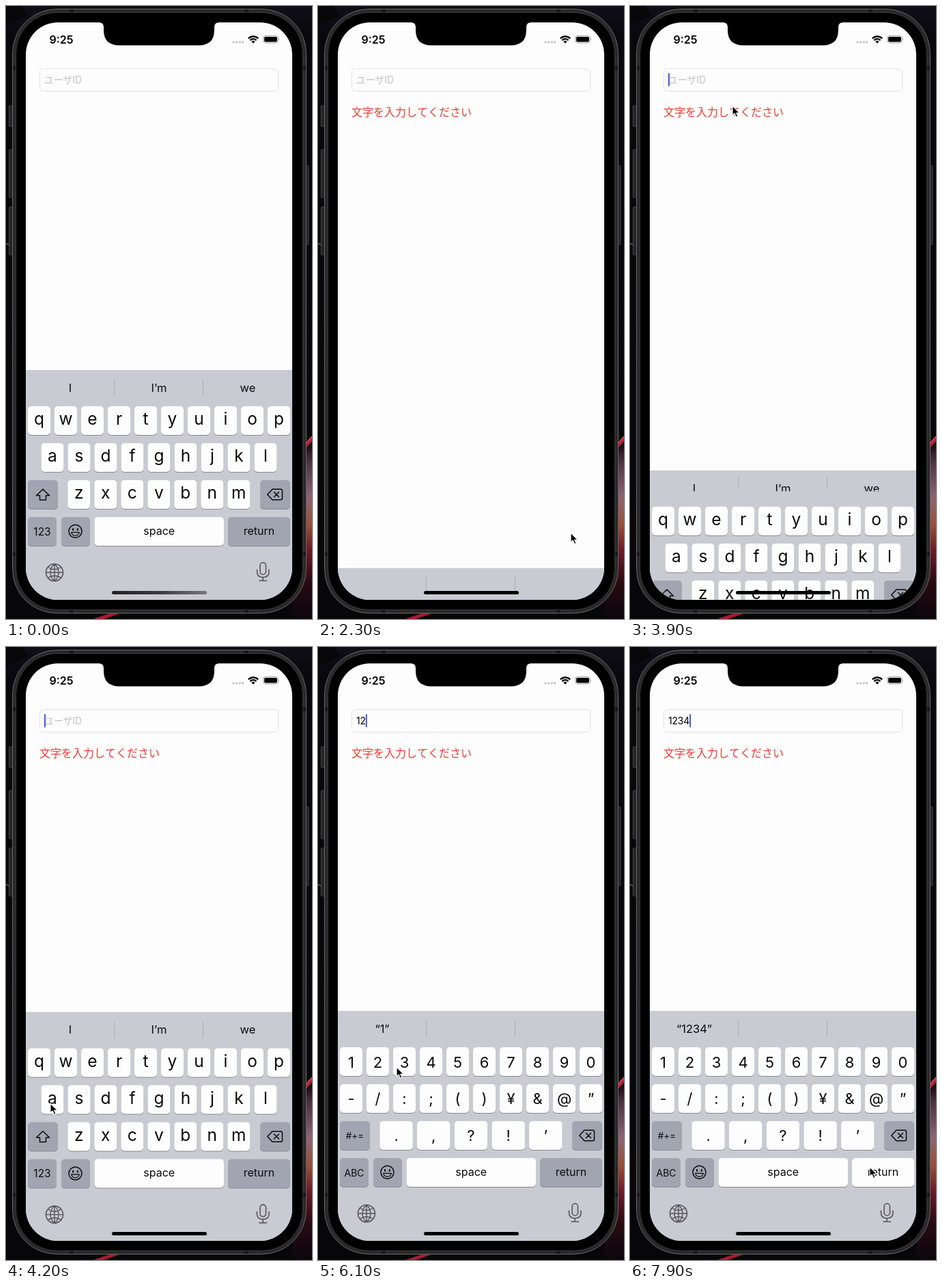
Write an HTML page with a canvas that moves like this. It is 448 by 896 pixels and loops after 8000 ms.

```html
<!DOCTYPE html>
<html lang="ja">
<head>
<meta charset="utf-8">
<title>User ID form</title>
<style>
  html, body { margin: 0; width: 100%; height: 100%; overflow: hidden; background: #08070a; }
  canvas { display: block; }
</style>
</head>
<body>
<canvas id="stage" width="448" height="896"></canvas>
<script>
const ctx = document.getElementById('stage').getContext('2d');
const LOOP = 8000;
const FONT = 'Inter, "Noto Sans CJK JP", "Noto Sans CJK", sans-serif';
const KEYBOARD_TOP = 532, SCREEN_BOTTOM = 868;
const HIDE_AT = 2115, SHOW_AT = 3800, NUMBERS_AT = 4700;
const TYPED_AT = [5350, 5960, 6400, 6900];
const SUGGEST_DELAY = 200;

// Pointer path: time, x, y
const POINTER = [
  [1600, 452, 700], [1950, 370, 770], [2400, 370, 770], [3300, 150, 108],
  [3750, 150, 110], [3900, 150, 146], [4200, 65, 667], [4550, 52, 766],
  [4750, 52, 766], [5200, 46, 612], [5400, 46, 612], [5750, 87, 612],
  [5950, 87, 612], [6100, 115, 614], [6450, 120, 613], [6750, 163, 612],
  [7000, 163, 612], [7650, 351, 760], [8000, 351, 760]
];

const clamp = v => Math.max(0, Math.min(1, v));
const ease = v => v * v * (3 - 2 * v);
// Critically damped spring from 0 to 1
const spring = ms => {
  const u = 0.0187 * Math.max(0, ms);
  return 1 - (1 + u) * Math.exp(-u);
};

function box(x, y, w, h, r, fill, stroke, width = 1) {
  ctx.beginPath();
  ctx.roundRect(x, y, w, h, r);
  if (fill) { ctx.fillStyle = fill; ctx.fill(); }
  if (stroke) { ctx.strokeStyle = stroke; ctx.lineWidth = width; ctx.stroke(); }
}

function path(d, fill, stroke, width = 1.5) {
  const p = new Path2D(d);
  if (fill) { ctx.fillStyle = fill; ctx.fill(p); }
  if (stroke) {
    ctx.strokeStyle = stroke;
    ctx.lineWidth = width;
    ctx.lineCap = ctx.lineJoin = 'round';
    ctx.stroke(p);
  }
}

function text(str, x, y, size, color = '#0b0b0c', align = 'center', weight = 400) {
  ctx.font = `${weight} ${size}px ${FONT}`;
  ctx.textAlign = align;
  ctx.fillStyle = color;
  ctx.fillText(str, x, y);
}

function gradient(x0, y0, x1, y1, stops) {
  const g = ctx.createLinearGradient(x0, y0, x1, y1);
  stops.forEach(([at, color]) => g.addColorStop(at, color));
  return g;
}

function drawWallpaper() {
  ctx.fillStyle = gradient(0, 0, 0, 896, [[0, '#100e19'], [0.05, '#09080c'], [1, '#070608']]);
  ctx.fillRect(0, 0, 448, 896);
  path('M0 0H22L32 12L0 30Z', '#07070a');
  path('M0 347L6 350', null, '#4a4a50', 2);
  ctx.fillStyle = gradient(0, 640, 0, 896, [
    [0, '#14070c'], [0.1, '#4c3240'], [0.3, '#8d6472'], [0.46, '#9a5038'],
    [0.6, '#6f1c28'], [0.8, '#260a13'], [1, '#0c070b']
  ]);
  ctx.fillRect(420, 640, 28, 256);
  path('M434 648L449 631', null, '#c01c38', 5);
  path('M434 645L449 628', null, '#d98a94', 1);
  path('M124 900L170 884', null, '#a51c30', 5);
}

function drawPhone() {
  for (const [y, h] of [[146, 30], [210, 70], [294, 70]]) box(4.5, y, 6, h, 1, '#242425', '#414143');
  box(438, 233.5, 5, 115, 1, '#242425', '#414143');
  box(9.5, 4.5, 430, 883, 65, '#29292a', '#666668');
  ctx.fillStyle = '#171718';
  for (const x of [93, 349]) { ctx.fillRect(x, 5, 6, 5); ctx.fillRect(x, 882, 6, 5); }
  for (const y of [88, 798]) { ctx.fillRect(10, y, 5, 6); ctx.fillRect(434, y, 5, 6); }
  box(14.5, 9.5, 420, 873, 60, '#000', '#3a3a3b');
}

function drawStatusBar() {
  path('M136 23H312V24Q305 24 305 31V35Q305 57.5 282 57.5H166Q143 57.5 143 35V31Q143 24 136 24Z', '#000');
  text('9:25', 81, 54.5, 16, '#000', 'center', 600);
  for (let i = 0; i < 4; i++) box(331.3 + i * 4.6, 51.2, 3.4, 3.4, 1.7, '#c3c3c5');
  ctx.lineCap = 'butt';
  ctx.strokeStyle = '#000';
  ctx.lineWidth = 2.3;
  for (const r of [6.3, 10]) {
    ctx.beginPath();
    ctx.arc(362, 54.5, r, -Math.PI * 0.755, -Math.PI * 0.245);
    ctx.stroke();
  }
  path('M362 54.7L359.3 51.8Q362 49.7 364.7 51.8Z', '#000');
  box(376.5, 43.5, 22, 10.5, 3.5, null, '#a2a2a4');
  box(378, 45, 19, 7.5, 2, '#000');
  path('M399.8 47Q401.5 48.7 399.8 50.7Z', '#a2a2a4');
}

function drawForm(t) {
  box(49.5, 91.5, 349, 33, 5, '#fdfdfd', '#e3e3e5');
  const typed = '1234'.slice(0, TYPED_AT.filter(at => t >= at).length);
  ctx.letterSpacing = '-0.2px';
  text(typed || 'ユーザID', 56, 113, 14, typed ? '#000' : '#c3c3c6', 'left');
  const caretX = 56 + (typed ? ctx.measureText(typed).width : 0);
  ctx.letterSpacing = '0px';

  const focused = t < HIDE_AT || t >= SHOW_AT;
  if (focused) {
    const restart = [300 - 900, SHOW_AT, ...TYPED_AT].filter(at => t >= at).pop();
    const phase = (t - restart) % 900;
    const fadeOut = 1 - (phase - 400) / 200, fadeIn = (phase - 600) / 300;
    ctx.globalAlpha = clamp(phase < 600 ? fadeOut : fadeIn);
    box(caretX, 98, 2, 19.5, 1, '#3f59dc');
    ctx.globalAlpha = 1;
  }
  if (t >= HIDE_AT) text('文字を入力してください', 49, 161, 16, '#f4382f', 'left');
}

function key(x, y, w, label, size, baseline, fill = '#fdfdfd') {
  box(x, y + 1, w, 42, 5, '#888a90');
  box(x, y, w, 42, 5, fill);
  if (label) text(label, x + w / 2, y + baseline, size);
}

function keyRow(labels, x, y, w, pitch, size, baseline) {
  [...labels].forEach((label, i) => key(x + i * pitch, y, w, label, size, baseline));
}

function drawIcons(numeric) {
  const ink = '#0b0b0c', gray = '#55565b';
  if (!numeric) path('M54 174.2L63.5 183.5H58.5V190H49.5V183.5H44.5Z', null, ink);
  path('M390 174.3H402Q404.5 174.3 404.5 176.8V187.2Q404.5 189.7 402 189.7H390L382.8 182ZM392.5 178.5L399.5 185.5M399.5 178.5L392.5 185.5', null, ink);

  box(92, 226.3, 19, 19, 9.5, null, ink, 1.5);
  box(97, 231.3, 2.2, 3.6, 1.1, ink);
  box(103.8, 231.3, 2.2, 3.6, 1.1, ink);
  path('M95.7 237.3H107.3Q106 242.3 101.5 242.3T95.7 237.3Z', null, ink, 1.2);

  box(58.5, 283.5, 25, 25, 12.5, null, gray, 1.6);
  path('M71 283.5V308.5M58.5 296H83.5M61.5 288.5Q71 294 80.5 288.5M61.5 303.5Q71 298 80.5 303.5M71 283.5C63 290 63 302 71 308.5C79 302 79 290 71 283.5', null, gray, 1.4);
  box(372, 281.5, 8.5, 17.5, 4.25, null, gray, 1.6);
  path('M367.5 292V295Q367.5 303 376.2 303T385 295V292M376.2 303V308M371 308H381.5', null, gray, 1.6);
}

function drawSuggestions(t, hiding) {
  const scale = t >= SHOW_AT ? 0.3 + 0.7 * spring(t - SHOW_AT) : 1;
  ctx.fillStyle = '#aeb0b7';
  for (const x of [158, 288]) ctx.fillRect(x, 13.5 * scale, 1, 24.5 * scale);
  if (hiding) return;
  const count = TYPED_AT.filter(at => t >= at + SUGGEST_DELAY).length;
  const words = count ? [`“${'1234'.slice(0, count)}”`] : ['I', 'I’m', 'we'];
  ctx.save();
  ctx.beginPath();
  ctx.rect(29, 0, 390, 44 * scale);
  ctx.clip();
  words.forEach((word, i) => text(word, 94 + i * 130, 31.8, 16.5));
  ctx.restore();
}

function drawKeyboard(t) {
  const hiding = t >= HIDE_AT && t < SHOW_AT;
  const shown = t < HIDE_AT ? 1 : hiding ? 1 - spring(t - HIDE_AT) : spring(t - SHOW_AT);
  const numeric = t >= NUMBERS_AT;
  const pressed = (t >= 2000 && t < HIDE_AT) || t >= 7800;
  const dark = '#a0a5b1';
  ctx.save();
  ctx.translate(0, SCREEN_BOTTOM - (SCREEN_BOTTOM - KEYBOARD_TOP) * shown);
  ctx.fillStyle = '#c9cbd2';
  ctx.fillRect(29, 0, 390, 340);
  drawSuggestions(t, hiding);

  if (numeric) {
    keyRow('1234567890', 32, 53, 33, 39, 22, 29.5);
    keyRow('-/:;()¥&@”', 32, 107, 33, 39, 22, 29);
    keyRow('.,?!’', 90.3, 161, 48.5, 54.7, 22, 29);
  } else {
    keyRow('qwertyuiop', 32, 53, 33, 39, 24.5, 27);
    keyRow('asdfghjkl', 51.5, 107, 33, 39, 24.5, 27);
    keyRow('zxcvbnm', 90.3, 161, 33, 39, 24.5, 27);
  }
  key(32, 161, 44, numeric ? '#+=' : '', 13.5, 26, dark);
  key(372, 161, 44, '', 0, 0, dark);
  key(32, 215, 42, numeric ? 'ABC' : '123', numeric ? 14 : 15.5, 26.5, dark);
  key(81, 215, 42, '', 0, 0, dark);
  key(129.5, 215, 189.5, 'space', 16, 25.5);
  key(325, 215, 91, 'return', 16, 25.5, pressed ? '#fdfdfd' : dark);
  drawIcons(numeric);
  ctx.restore();
}

function drawPointer(t) {
  if (t < POINTER[0][0]) return;
  const next = POINTER.findIndex(p => p[0] > t);
  const [t0, x0, y0] = POINTER[next - 1], [t1, x1, y1] = POINTER[next];
  const k = ease((t - t0) / (t1 - t0));
  ctx.save();
  ctx.translate(x0 + (x1 - x0) * k, y0 + (y1 - y0) * k);
  path('M0 0V14L3.2 11L5.6 16.5L8 15.5L5.7 10.2H10Z', '#000', '#fff', 1.1);
  ctx.restore();
}

function draw(t) {
  drawWallpaper();
  drawPhone();
  ctx.save();
  ctx.beginPath();
  ctx.roundRect(29, 24, 390, 844, 47);
  ctx.clip();
  ctx.fillStyle = '#fdfdfd';
  ctx.fillRect(29, 24, 390, 844);
  drawStatusBar();
  drawForm(t);
  drawKeyboard(t);
  const bar = t < 800 ? gradient(155, 0, 294, 0, [[0, '#222225'], [0.5, '#3a3a3d'], [1, '#77777b']]) : '#000';
  box(155, 855, 139, 5, 2.5, bar);
  ctx.restore();
  drawPointer(t);
}

const start = performance.now();
function tick() {
  draw((performance.now() - start) % LOOP);
  requestAnimationFrame(tick);
}
tick();
</script>
</body>
</html>
```
